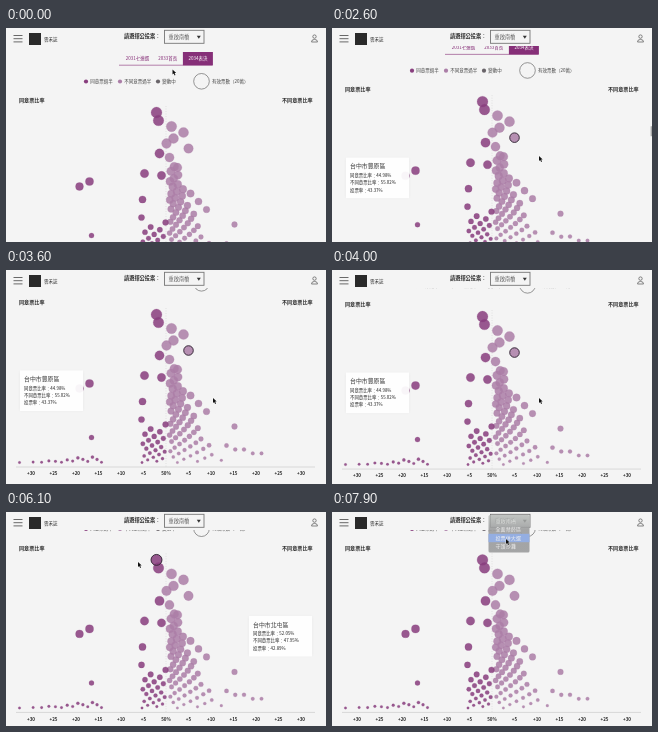
Recreate the animation shown at these times as an HTML page with a canvas. Size 320 by 214 pixels, loop 8 s.

```html
<!DOCTYPE html>
<html lang="zh-Hant">
<head>
<meta charset="utf-8">
<title>投票氣泡圖</title>
<style>
html, body { margin: 0; width: 100%; height: 100%; overflow: hidden; background: #f4f4f4; }
canvas { display: block; width: 100vw; height: 100vh; }
</style>
</head>
<body>
<canvas id="stage"></canvas>
<script>
const W = 320, H = 214, LOOP = 8000, STEP = 100;
const MID = 160, FLOOR = 237, HEADER = 18;
const BG = '#f4f4f4', INK = '#2b2b2b', PLUM = '#862f78';
const FONT = '"Noto Sans CJK TC", "Noto Sans CJK JP", "Noto Sans CJK", sans-serif';
const DARK = [136, 62, 126], LIGHT = [171, 126, 167];
const GREEN = [72, 179, 128], BLUE = [74, 124, 208];

const canvas = document.getElementById('stage');
const ctx = canvas.getContext('2d');

const clamp = v => Math.max(0, Math.min(1, v));
const mix = (a, b, k) => a + (b - a) * k;
const progress = (t, start, length) => clamp((t - start) / length);
const easeOut = k => 1 - (1 - k) ** 3;
const smooth = k => k * k * (3 - 2 * k);
const spread = i => (i * 0.618034) % 1;

// The largest bubbles are placed, the dense lower ones follow a fan.
const bubbles = [
  [150, 84], [152, 92], [153, 125], [138, 145], [155, 147], [136, 171], [135, 189],
  [83, 153], [73, 158], [85, 207],
  [165, 98], [177, 104], [167, 110], [160, 115], [182, 120], [171, 139],
  [184, 165], [192, 173], [200, 181], [228, 196]
];
const radius = y => Math.sqrt(0.19 * (FLOOR - y) + 0.6);

function scatter(count, place) {
  for (let i = 0; i < count; i++) bubbles.push(place(i / (count - 1), spread(i)));
}
scatter(58, (k, s) => [163 + s ** 1.3 * (8 + 46 * k), 129 + 103 * k ** 0.6]);
scatter(22, (k, s) => [159 - 24 * s, 194 + 38 * k ** 0.7]);
scatter(14, (k, s) => [13 + 82 * k ** 0.7, 232 - 8 * s * k]);
scatter(5, (k, s) => [220 + 35 * k, 221 + 4 * s - 6 * (1 - k)]);

// Start, duration, destination.
const moves = [
  [100, 200, 162.5, 35], [900, 500, 192, 32], [1500, 400, 190, 37],
  [2100, 300, 207, 128], [4300, 400, 169.5, 104], [4700, 400, 137, 154],
  [5100, 400, 84, 118], [5500, 300, 148, 48], [5800, 300, 132, 50],
  [6100, 500, 176, 12], [7300, 500, 174, 27]
];

const hovers = [
  { from: 2300, x: 182, y: 120, name: '台中市豐原區', yes: 44.98, turnout: 43.37 },
  { from: 4600, x: 171, y: 139, name: '台中市潭子區', yes: 47.32, turnout: 41.71 },
  { from: 5000, x: 135, y: 189, name: '台中市石岡區', yes: 55.53, turnout: 40.26 },
  { from: 5400, x: 83, y: 153, name: '台北市文山區', yes: 67.11, turnout: 46.15 },
  { from: 5800, x: 150, y: 84, name: '台中市北屯區', yes: 52.05, turnout: 42.89 },
  { from: 6300 }
];

const scrollAt = t => 40 * easeOut(progress(t, 2500, 1000)) - 3.4 * smooth(progress(t, 3600, 700));

function cursorAt(t) {
  let x = 166.5, y = 41.5;
  for (const [start, length, toX, toY] of moves) {
    const k = smooth(progress(t, start, length));
    x = mix(x, toX, k);
    y = mix(y, toY, k);
  }
  return [x, y];
}

function text(str, x, y, size, color = INK, weight = 500, align = 'left') {
  ctx.font = `${weight} ${size}px ${FONT}`;
  ctx.textAlign = align;
  ctx.textBaseline = 'middle';
  ctx.fillStyle = color;
  ctx.fillText(str, x, y);
}

function rect(x, y, w, h, color) {
  ctx.fillStyle = color;
  ctx.fillRect(x, y, w, h);
}

function circle(x, y, r, fill, stroke, width = 0.7) {
  ctx.beginPath();
  ctx.arc(x, y, r, 0, Math.PI * 2);
  if (fill) { ctx.fillStyle = fill; ctx.fill(); }
  if (stroke) { ctx.strokeStyle = stroke; ctx.lineWidth = width; ctx.stroke(); }
}

function line(x1, y1, x2, y2, color, width = 0.7) {
  ctx.beginPath();
  ctx.moveTo(x1, y1);
  ctx.lineTo(x2, y2);
  ctx.strokeStyle = color;
  ctx.lineWidth = width;
  ctx.stroke();
}

function drawTabs(active) {
  ['2031七連選', '2033首長', '2034表決'].forEach((label, i) => {
    const cx = 131.5 + i * 30.2;
    if (i === active) rect(cx - 15, 24, 30, 13.3, PLUM);
    text(label, cx, 30.5, 4.5, i === active ? '#fff' : PLUM, 500, 'center');
  });
  line(113, 37.2, 206.5, 37.2, PLUM, 0.6);
}

function drawLegend(party) {
  const items = party
    ? [['晨星黨', 103, BLUE], ['遠帆黨', 128, GREEN]]
    : [['同意票過半', 80, DARK], ['不同意票過半', 114, LIGHT], ['變動中', 152, [105, 100, 105]]];
  for (const [label, x, c] of items) {
    circle(x, 53.5, 2.1, `rgb(${c})`);
    text(label, x + 4.3, 53.3, 4.5, '#444');
  }
  const x = party ? 172 : 195.5;
  circle(x, 53.3, 7.8, null, '#555', 0.6);
  text('有效票數（20萬）', x + 10.5, 53, 4.5, '#444');
}

function drawAxis() {
  ctx.setLineDash([1, 1.5]);
  line(MID, 78, MID, FLOOR, '#cfcfcf', 0.5);
  ctx.setLineDash([]);
  line(10, FLOOR, 309, FLOOR, '#c4c4c4', 0.6);
  for (let i = -6; i <= 6; i++) {
    const label = i ? '+' + Math.abs(i) * 5 : '50%';
    text(label, MID + i * 22.5, 243.4, 4.5, '#222', 700, 'center');
  }
}

function drawBubbles(party, hover) {
  ctx.save();
  ctx.translate(0.5, 0.5);
  for (const [x, y] of bubbles) {
    const from = x < MID ? DARK : LIGHT, to = x < 110 ? BLUE : GREEN;
    const c = from.map((v, i) => Math.round(mix(v, to[i], party)));
    circle(x, y, radius(y), `rgba(${c},.86)`, `rgba(${c},.7)`, 0.3);
  }
  if (hover) circle(hover.x, hover.y, radius(hover.y), null, '#2d2430', 0.9);
  ctx.restore();
}

function drawCard({ x, name, yes, turnout }) {
  const left = x > MID ? 14 : 243;
  ctx.save();
  ctx.shadowColor = 'rgba(0,0,0,.06)';
  ctx.shadowBlur = 3;
  rect(left, 140.5, 63, 40.5, 'rgba(255,255,255,.94)');
  ctx.restore();
  text(name, left + 4, 149, 5.9, '#333');
  const rows = [['同意票比率', yes], ['不同意票比率', 100 - yes], ['投票率', turnout]];
  rows.forEach(([label, v], i) =>
    text(`${label}：${v.toFixed(2)}%`, left + 4, 158.1 + i * 7.3, 4.4, '#222'));
}

function drawUser(x, y) {
  circle(x, y - 1.9, 1.7, null, '#555');
  ctx.beginPath();
  ctx.ellipse(x, y + 3.5, 3, 2.6, 0, Math.PI, 0);
  ctx.closePath();
  ctx.stroke();
}

function drawHeader() {
  rect(0, 0, W, HEADER, BG);
  for (let i = 0; i < 3; i++) line(7.5, 7.5 + i * 3.2, 16.5, 7.5 + i * 3.2, '#444', 0.8);
  rect(23, 5, 12, 12, '#2a2a2a');
  text('雲禾誌', 38, 11, 4.5);
  text('請選擇公投案：', 118, 8.5, 5.2, INK, 700);
  ctx.strokeStyle = '#777';
  ctx.lineWidth = 0.9;
  ctx.strokeRect(158.5, 2.3, 39.5, 13);
  text('重啟南橋', 162.5, 9, 5.2, '#666');
  ctx.fillStyle = '#333';
  ctx.fill(new Path2D('M190.8 7.7h4l-2 3z'));
  drawUser(308.5, 10.5);
}

function drawMenu(t) {
  const row = t < 7400 ? 0 : t < 7600 ? 1 : 2;
  ctx.save();
  ctx.globalAlpha = progress(t, 6800, 300);
  const shade = ctx.createLinearGradient(0, 3, 0, 18);
  shade.addColorStop(0, 'rgba(180,184,181,.8)');
  shade.addColorStop(1, 'rgba(155,156,157,.9)');
  ctx.beginPath();
  ctx.roundRect(156.5, 3, 41, 37.5, 1.5);
  ctx.fillStyle = shade;
  ctx.fill();
  rect(156.5, 5 + row * 8.4, 41, 8.4, '#94aee2');
  ['重啟南橋', '全面禁菸區', '投票併大選', '守護沙灘'].forEach((s, i) =>
    text(s, 163.5, 9 + i * 8.4, 5.1, i ? '#f0f0f0' : '#d8dad8'));
  ctx.restore();
}

const arrow = new Path2D('M0 0V5L1.2 4l.9 1.9.9-.4-.9-1.9 1.6-.1z');
const hand = new Path2D('M0 0h1v2l2.5.6v3h-3l-1.9-2.4.6-.4.8.6z');

function drawCursor(x, y, overTab) {
  ctx.save();
  ctx.translate(x, y);
  ctx.fillStyle = overTab ? '#fff' : '#111';
  ctx.strokeStyle = overTab ? '#222' : '#fff';
  ctx.lineWidth = 0.6;
  ctx.stroke(overTab ? hand : arrow);
  ctx.fill(overTab ? hand : arrow);
  ctx.restore();
}

function draw(t) {
  const scroll = scrollAt(t);
  const [cx, cy] = cursorAt(t);
  const party = t >= 600 && t < 1600;
  const tint = progress(t, 500, 500) - progress(t, 1500, 400);
  const last = hovers.filter(h => h.from <= t).pop();
  const hover = last && last.name ? last : null;

  rect(0, 0, W, H, BG);
  ctx.save();
  ctx.translate(0, -scroll);
  drawTabs(party ? 1 : 2);
  drawLegend(party);
  text('同意票比率', 13, 72.3, 5.1, INK, 700);
  text('不同意票比率', 276, 72.3, 5.1, INK, 700);
  drawAxis();
  drawBubbles(tint, hover);
  if (hover) drawCard(hover);
  ctx.restore();

  if (t >= 2600 && t < 3400) rect(318.6, 95 + scroll * 0.3, 1.4, 10, '#aaa');
  drawHeader();
  if (t >= 6900) drawMenu(t);
  drawCursor(cx, cy, t >= 300 && t < 2000);
}

function frame(now) {
  const k = window.devicePixelRatio || 1;
  const w = Math.round(innerWidth * k), h = Math.round(innerHeight * k);
  if (canvas.width !== w || canvas.height !== h) {
    canvas.width = w;
    canvas.height = h;
  }
  ctx.setTransform(w / W, 0, 0, h / H, 0, 0);
  draw(Math.floor((now % LOOP) / STEP) * STEP);
  requestAnimationFrame(frame);
}
requestAnimationFrame(frame);
</script>
</body>
</html>
```
